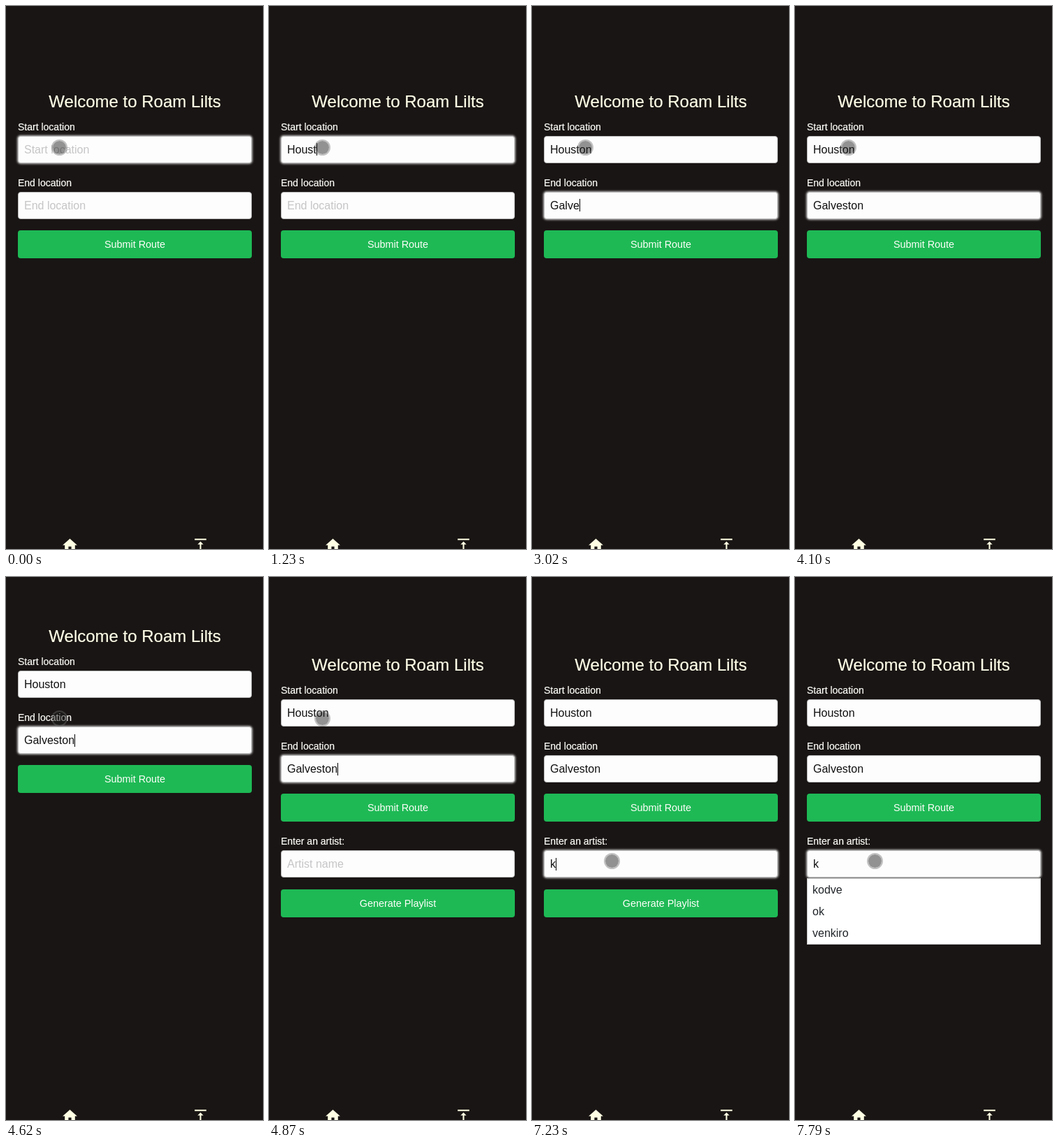
An HTML page for the animation above (8000 ms loop, 368 px wide and 777 px high).

```html
<!DOCTYPE html>
<html lang="en">
<head>
<meta charset="utf-8">
<title>Route form</title>
<style>
  html, body { margin: 0; width: 100%; height: 100%; overflow: hidden; background: #191514; }
  body { font-family: "Liberation Sans", Arial, sans-serif; color: #fffffa; }
  #stage { position: relative; width: 368px; height: 777px; overflow: hidden; }
  #stage div, #stage svg { position: absolute; box-sizing: border-box; white-space: pre; }
  #form, #artist { left: 0; top: 0; width: 368px; height: 0; }
  .title { left: 0; top: 122px; width: 369px; line-height: 30px; font-size: 24px; text-align: center; color: #ffffe8; -webkit-text-stroke: .2px; }
  .label { left: 17px; font-size: 14px; line-height: 20px; -webkit-text-stroke: .2px; }
  .field { left: 17px; width: 335px; height: 39px; border: 1px solid #b9b9b9; border-radius: 4px; background: #fdfdfd; }
  .text { left: 8px; top: 0; font-size: 16px; line-height: 37px; color: #101010; }
  .text.hint { color: #c5c5c7; }
  .caret { top: 9.3px; width: 1px; height: 18px; background: #000; }
  .button { left: 17px; width: 335px; height: 40px; border-radius: 4px; background: #1eb955; font-size: 14.4px; line-height: 40px; text-align: center; }
  #list { left: 17px; top: 431px; width: 335px; height: 95px; border: 1px solid #c8c8c8; background: #fff; color: #212529; font-size: 16px; line-height: 31px; padding-left: 7px; }
  #touch { left: 0; top: 0; width: 23px; height: 23px; border-radius: 50%; background: rgba(30,30,30,.48) padding-box; border: 2px solid rgba(110,110,110,.42); }
  svg { top: 758.8px; fill: #ffffe4; }
</style>
</head>
<body>
<div id="stage">
  <div id="form">
    <div class="title">Welcome to Roam Lilts</div>
    <div class="label" style="top:163px">Start location</div>
    <div class="field" style="top:186px" data-hint="Start location"></div>
    <div class="label" style="top:243px">End location</div>
    <div class="field" style="top:266px" data-hint="End location"></div>
    <div class="button" style="top:321px">Submit Route</div>
    <div id="artist">
      <div class="label" style="top:379px">Enter an artist:</div>
      <div class="field" style="top:402px" data-hint="Artist name"></div>
      <div class="button" style="top:457.3px">Generate Playlist</div>
    </div>
  </div>
  <div id="list">kodve
ok
venkiro</div>
  <svg style="left:78.5px" width="25" height="25" viewBox="0 0 24 24"><path d="M10 20v-6h4v6h5v-8h3L12 3 2 12h3v8z"/></svg>
  <svg style="left:266px" width="25" height="25" viewBox="0 0 24 24"><path d="M8 11h3v10h2V11h3l-4-4-4 4zM4 3v2h16V3H4z"/></svg>
  <div id="touch"></div>
</div>
<script>
const LOOP = 8000, BLINK = 530, FADE = 200;
const SUBMIT = 4470, ROUTE_READY = 4870, SUGGEST = 7510;
const MOVE = 6080, MOVE_STEP = 120, MOVE_STEPS = 4;

const [form, artist, list, touch] =
  ['form', 'artist', 'list', 'touch'].map(id => document.getElementById(id));

const clamp = x => Math.min(1, Math.max(0, x));
const smooth = x => x * x * (3 - 2 * x);

// The first field already has focus when the loop begins.
const entries = [
  { word: 'Houston', focus: -790, firstKey: 544, pace: 139 },
  { word: 'Galveston', focus: 1650, firstKey: 2322, pace: 154.7 },
  { word: 'k', focus: 6550, firstKey: 7230, pace: 140 }
];

function addChild(box, name) {
  const el = document.createElement('div');
  el.className = name;
  return box.appendChild(el);
}

const fields = [...document.querySelectorAll('.field')].map((box, i) => ({
  ...entries[i],
  blur: entries[i + 1]?.focus ?? LOOP,
  box,
  text: addChild(box, 'text'),
  caret: addChild(box, 'caret')
}));

function drawField({ word, focus, blur, firstKey, pace, box, text, caret }, t) {
  const typed = Math.min(word.length, Math.max(0, Math.floor((t - firstKey) / pace) + 1));
  const content = typed ? word.slice(0, typed) : box.dataset.hint;
  if (text.textContent !== content) text.textContent = content;
  text.classList.toggle('hint', !typed);

  const glow = clamp((t - focus) / FADE) - clamp((t - blur) / FADE);
  box.style.boxShadow = `0 0 3px 1px rgba(255,255,255,${glow * .75})`;

  // Every keystroke restarts the blink.
  const lastInput = typed ? firstKey + (typed - 1) * pace : focus;
  const lit = Math.floor((t - lastInput) / BLINK) % 2 === 0;
  caret.style.display = t >= focus && t < blur && lit ? 'block' : 'none';
  caret.style.left = 8 + (typed ? Math.round(text.offsetWidth) : 0) + 'px';
}

function draw(t) {
  form.style.top = (t < SUBMIT ? 0 : t < ROUTE_READY ? -51.6 : -10.6) + 'px';
  artist.style.display = t < ROUTE_READY ? 'none' : 'block';
  list.style.display = t < SUGGEST ? 'none' : 'block';
  fields.forEach(field => drawField(field, t));

  const step = Math.floor((t - MOVE) / MOVE_STEP) + 1;
  const k = smooth(clamp(step / MOVE_STEPS));
  touch.style.transform = `translate(${65 + 38 * k}px, ${191 + 204 * k}px)`;
}

const begin = performance.now();
function tick() {
  draw((performance.now() - begin) % LOOP);
  requestAnimationFrame(tick);
}
tick();
</script>
</body>
</html>
```
